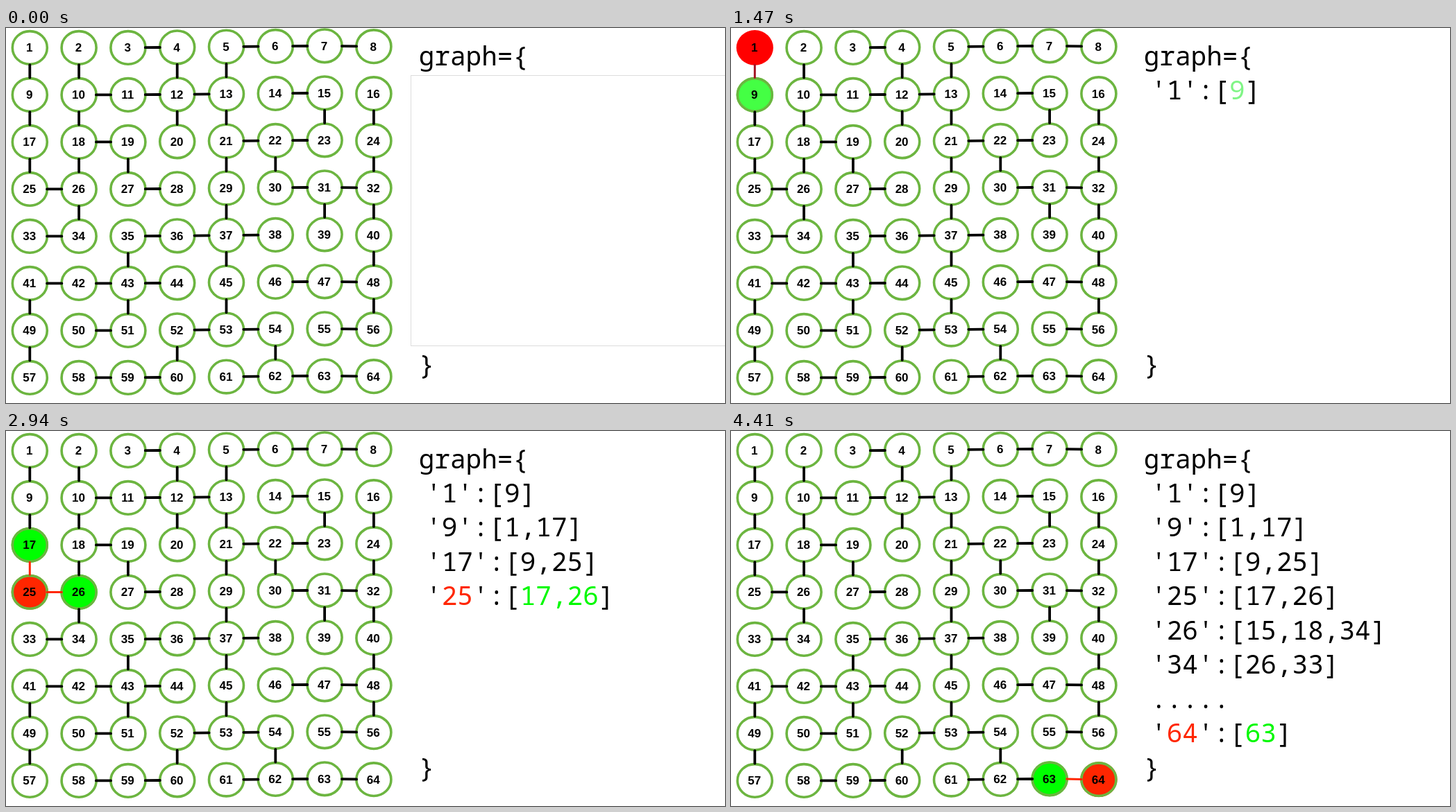
These frames come from a looping animation (1036x541 px, 4.83 s). An HTML page:

```html
<!DOCTYPE html>
<html lang="en">
<head>
<meta charset="utf-8">
<title>Building an adjacency list</title>
<style>
  html, body { margin: 0; width: 100%; height: 100%; overflow: hidden; background: #fff; }
  svg { display: block; width: 1036px; height: 541px; }
  .ring { fill: none; stroke: #6cb540; stroke-width: 3.6; }
  .edge { stroke: #000; stroke-width: 3.8; stroke-linecap: round; }
  .label { font: bold 17px "Liberation Sans", Arial, sans-serif; text-anchor: middle; }
  .code { font: 37.7px "Noto Sans Mono", "DejaVu Sans Mono", monospace; white-space: pre; }
</style>
</head>
<body>
<svg id="stage" viewBox="0 0 1036 541"></svg>
<script>
const LOOP = 4830;
const RED = '#ff2600', GREEN = '#00ff00', SOFT_RED = '#ff4040', SOFT_GREEN = '#44ff44';
const TEXT_GREEN = '#00f900', TEXT_SOFT = '#80f586';

// Each entry is the left (or upper) node of an edge.
const across = [3, 5, 6, 7, 10, 11, 12, 14, 18, 21, 22, 25, 27, 30, 31, 33, 35, 36, 37,
  41, 42, 43, 46, 47, 50, 52, 53, 55, 58, 59, 61, 62, 63];
const down = [1, 2, 4, 5, 9, 10, 12, 13, 15, 16, 17, 18, 19, 21, 22, 24, 26, 29, 31, 32,
  35, 37, 40, 41, 43, 45, 48, 49, 52, 54];
const edges = [...across.map(n => [n, n + 1]), ...down.map(n => [n, n + 8])];

const lift = [0, 0, 0, 0.6, 1.3, 2, 2.6, 1.7];
const rows = [['1', '9'], ['9', '1,17'], ['17', '9,25'], ['25', '17,26'],
  ['26', '15,18,34'], ['34', '26,33'], null, ['64', '63']];

const scenes = [
  { at: 0, box: true },
  { at: 420, box: true, bare: true, nodes: { 1: '#f00' } },
  { at: 1400, rows: 1, bare: true, nodes: { 1: '#f00', 9: SOFT_GREEN },
    edges: { '1-9': '#a31222' }, key: '#000', list: TEXT_SOFT },
  { at: 1890, rows: 2, nodes: { 9: RED, 1: GREEN, 17: GREEN },
    edges: { '1-9': RED, '9-17': RED } },
  { at: 2380, rows: 3, nodes: { 9: SOFT_GREEN, 17: SOFT_RED, 25: GREEN },
    edges: { '9-17': '#ff8080', '17-25': RED }, list: TEXT_SOFT },
  { at: 2870, rows: 4, nodes: { 25: RED, 17: GREEN, 26: GREEN },
    edges: { '17-25': RED, '25-26': RED } },
  { at: 3360, rows: 5, nodes: { 26: RED, 25: GREEN, 18: GREEN, 34: GREEN },
    edges: { '25-26': RED, '18-26': RED, '26-34': RED } },
  { at: 3850, rows: 6, nodes: { 34: RED, 26: GREEN, 33: GREEN },
    edges: { '26-34': RED, '33-34': RED } },
  { at: 4340, rows: 8, nodes: { 64: RED, 63: GREEN }, edges: { '63-64': RED } }
];

function place(n) {
  const col = (n - 1) % 8, row = Math.floor((n - 1) / 8);
  return { x: 34.3 + 70.8 * col, y: 28.4 + 68 * row - lift[col] };
}

function drawNode(n, fill, bare) {
  const { x, y } = place(n);
  const disc = fill ? `<ellipse cx="${x}" cy="${y}" rx="26.6" ry="25.4" fill="${fill}"/>` : '';
  const ring = fill && bare && n === 1 ? '' :
    `<ellipse class="ring" cx="${x}" cy="${y}" rx="25" ry="23.8"/>`;
  return `${disc}${ring}<text class="label" x="${x - 0.6}" y="${y + 6}">${n}</text>`;
}

function drawEdge([from, to], color) {
  const a = place(from), b = place(to);
  const length = Math.hypot(b.x - a.x, b.y - a.y);
  const dx = (b.x - a.x) / length * 24.8, dy = (b.y - a.y) / length * 24.8;
  const style = color ? ` style="stroke:${color};stroke-width:3"` : '';
  return `<line class="edge" x1="${a.x + dx}" y1="${a.y + dy}" x2="${b.x - dx}" y2="${b.y - dy}"${style}/>`;
}

const code = (x, line, text) =>
  `<text class="code" x="${x}" y="${53.5 + 49.45 * line}">${text}</text>`;
const tint = (text, color) => `<tspan fill="${color}">${text}</tspan>`;

function drawRow(row, i, scene) {
  if (!row) return code(605, i + 1, '.....');
  const current = i === scene.rows - 1;
  const key = tint(row[0], current ? scene.key || RED : '#000');
  const list = tint(row[1], current ? scene.list || TEXT_GREEN : '#000');
  return code(605, i + 1, `'${key}':[${list}]`);
}

function drawScene(scene) {
  const { nodes = {}, edges: lit = {} } = scene;
  let out = '';
  for (let n = 1; n <= 64; n++) out += drawNode(n, nodes[n], scene.bare);
  for (const edge of edges) out += drawEdge(edge, lit[edge.join('-')]);
  if (scene.box) out += '<rect x="583.5" y="68.5" width="460" height="390" fill="#fff" stroke="#dcdcdc"/>';
  out += code(594.7, 0, 'graph={') + code(594.7, 9, '}');
  return out + rows.slice(0, scene.rows || 0).map((row, i) => drawRow(row, i, scene)).join('');
}

const stage = document.getElementById('stage');
const start = performance.now();
let shown = null;

function tick() {
  const time = (performance.now() - start) % LOOP;
  const scene = scenes.filter(s => s.at <= time).pop();
  if (scene !== shown) {
    stage.innerHTML = drawScene(scene);
    shown = scene;
  }
  requestAnimationFrame(tick);
}
tick();
</script>
</body>
</html>
```
